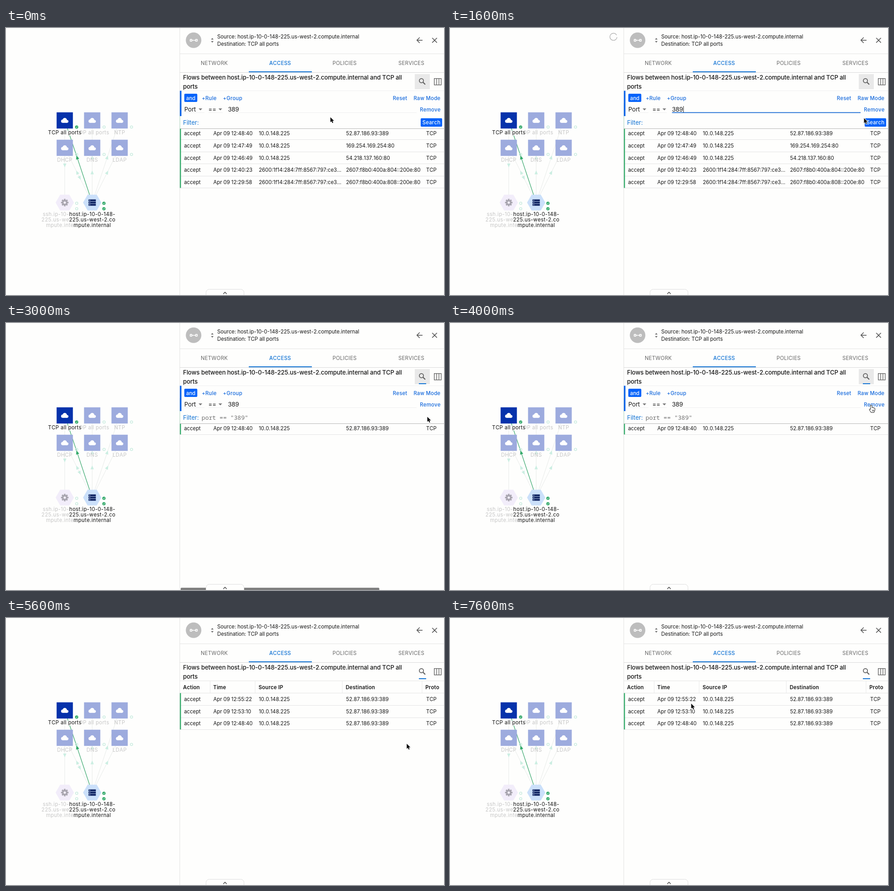
An HTML page with a canvas for the animation above (8000 ms loop, 958 px wide and 585 px high).

```html
<!DOCTYPE html>
<html lang="en">
<head>
<meta charset="utf-8">
<title>Flow search</title>
<style>
html, body { margin: 0; width: 100%; height: 100%; overflow: hidden; background: #fefefd; }
canvas { display: block; width: 958px; height: 585px; }
</style>
</head>
<body>
<canvas id="stage" width="958" height="585"></canvas>
<script>
const ctx = document.getElementById('stage').getContext('2d');
const LOOP = 8000, STEP = 200;
const BG = '#fefefd', INK = '#151515', GREY = '#666', BLUE = '#0a62e8', BUTTON = '#0563fa',
      LINK = '#1469dc', GREEN = '#32a969', RULE = '#e4e4e4';
const SMALL = 11.28, LARGE = 13.16, ROW = 26.55, TABLE_TOP = 164.5;

// y is the middle of the capital letters
function text(str, x, y, o = {}) {
  const size = o.size || SMALL;
  ctx.font = `${o.weight || 400} ${size}px ${o.mono ? '"Noto Sans Mono", monospace' : 'Inter, sans-serif'}`;
  ctx.fontKerning = 'none';
  ctx.letterSpacing = (o.gap || 0) + 'px';
  ctx.textAlign = o.align || 'left';
  const base = y + size * 0.364;
  if (o.halo) {
    ctx.strokeStyle = BG;
    ctx.lineWidth = 3;
    ctx.lineJoin = 'round';
    ctx.strokeText(str, x, base);
  }
  ctx.fillStyle = o.color || INK;
  ctx.fillText(str, x, base);
}

function rect(x, y, w, h, color, r = 0) {
  ctx.fillStyle = color;
  ctx.beginPath();
  ctx.roundRect(x, y, w, h, r);
  ctx.fill();
}

function path(points, color, width, closed) {
  ctx.beginPath();
  points.forEach(([x, y]) => ctx.lineTo(x, y));
  if (closed) ctx.closePath();
  ctx.lineJoin = 'miter';
  if (width) {
    ctx.strokeStyle = color;
    ctx.lineWidth = width;
    ctx.stroke();
  } else {
    ctx.fillStyle = color;
    ctx.fill();
  }
}

function disc(x, y, r, color) {
  ctx.fillStyle = color;
  ctx.beginPath();
  ctx.arc(x, y, r, 0, Math.PI * 2);
  ctx.fill();
}

function ring(x, y, r, color, width, from = 0, to = Math.PI * 2) {
  ctx.strokeStyle = color;
  ctx.lineWidth = width;
  ctx.beginPath();
  ctx.arc(x, y, r, from, to);
  ctx.stroke();
}

/* ---------- graph ---------- */

const HOST = [188.5, 382.5], SSH = [128.5, 382.5];
const CLOUDS = [
  ['TCP all ports', 128.5, 202.5], ['UDP all ports', 188.5, 202.5], ['NTP', 248.5, 202.5],
  ['DHCP', 128.5, 262.5], ['DNS', 188.5, 262.5], ['LDAP', 248.5, 262.5]
];

function arrow(a, b, at, color) {
  const angle = Math.atan2(b[1] - a[1], b[0] - a[0]);
  ctx.save();
  ctx.translate(a[0] + (b[0] - a[0]) * at, a[1] + (b[1] - a[1]) * at);
  ctx.rotate(angle);
  path([[4.5, 0], [-4, -3.6], [-4, 3.6]], color);
  ctx.restore();
}

function edge(a, b, line, head, width) {
  path([a, b], line, width);
  arrow(a, b, 0.55, head);
}

function cloud(x, y) {
  disc(x - 4.4, y + 1.7, 3.6, '#fff');
  disc(x, y - 0.6, 4.8, '#fff');
  disc(x + 4.8, y + 2.1, 3.2, '#fff');
  rect(x - 4.4, y + 1, 9.2, 4.3, '#fff');
}

function status(x, y, active) {
  if (!active) {
    ring(x, y, 2.6, '#c5eadd', 1.3);
    return;
  }
  disc(x, y, 3.6, GREEN);
  path([[x - 1.7, y], [x - 0.4, y + 1.3], [x + 1.8, y - 1.2]], '#fff', 1);
}

function hexagon([x, y], color) {
  path([[-20, 0], [-10, -17.3], [10, -17.3], [20, 0], [10, 17.3], [-10, 17.3]]
    .map(([dx, dy]) => [x + dx, y + dy]), color, 0, true);
}

function gear([x, y]) {
  const color = '#a9a6b0';
  for (let i = 0; i < 8; i++) {
    ctx.save();
    ctx.translate(x, y);
    ctx.rotate(i * Math.PI / 4);
    rect(-1.7, -8.2, 3.4, 4, color);
    ctx.restore();
  }
  ring(x, y, 4.4, color, 3.6);
}

function server([x, y]) {
  for (let i = -1; i <= 1; i++) {
    rect(x - 8, y + i * 4.9 - 2, 16, 4, '#0d2160');
    rect(x - 6, y + i * 4.9 - 0.7, 1.6, 1.4, '#cfe2fb');
  }
}

function hostLabel(name, x, o) {
  [name + '.ip-10-0-148-', '225.us-west-2.co', 'mpute.internal']
    .forEach((line, i) => text(line, x, 408.3 + i * 11.7, o));
}

function drawGraph() {
  const faint = { color: '#c6c6c6', gap: 0.4, align: 'center' };
  const strong = { color: '#111', gap: 0.38, align: 'center', halo: true };
  const line = '#e8ebe9', head = '#cbeee2';
  const dhcp = [128.5, 262.5];
  CLOUDS.slice(1).forEach(([, x, y]) => edge(HOST, [x, y], line, head, 1));
  arrow(dhcp, HOST, 0.55, head);
  path([[128.5, 202.5], SSH], line, 1);
  arrow(dhcp, SSH, 0.32, head);
  edge(HOST, [128.5, 202.5], '#43ac75', GREEN, 1.3);

  hexagon(SSH, '#f2edfa');
  gear(SSH);
  hexagon(HOST, '#cbe0fa');
  server(HOST);

  CLOUDS.forEach(([name, x, y], i) => {
    rect(x - 17.8, y - 17.8, 35.6, 35.6, i ? '#9dabde' : '#0632ab');
    cloud(x, y);
    status(x + 26, y + 14.5, !i);
    if (i) text(name, x, y + 26, faint);
  });
  [384, 396].forEach(y => {
    status(154.7, y, false);
    status(214.2, y, true);
  });
  text('TCP all ports', 128.7, 228.5, strong);
  hostLabel('ssh', 128.5, faint);
  hostLabel('host', 188.7, strong);
}

/* ---------- side panel ---------- */

function drawHeader() {
  rect(379.5, 0, 1, 585, '#e2e2e2');
  disc(410.3, 26.8, 17, '#bdbdbd');
  rect(405, 26.2, 10, 1.5, '#fff');
  for (const x of [402, 413.8]) {
    rect(x, 24, 5.4, 5.8, '#fff', 1.5);
    rect(x + 1.7, 25.8, 2, 2.2, '#bdbdbd');
  }
  path([[448.3, 25.3], [451.2, 22], [454.1, 25.3]], GREY);
  path([[448.3, 28.7], [451.2, 32], [454.1, 28.7]], GREY);
  text('Source: host.ip-10-0-148-225.us-west-2.compute.internal', 462, 19);
  text('Destination: TCP all ports', 462, 35.3);
  path([[911, 26.8], [899, 26.8]], '#555', 1.6);
  path([[904.8, 20.8], [898.8, 26.8], [904.8, 32.8]], '#555', 1.6);
  path([[932.2, 21.7], [942.6, 32.1]], '#555', 1.6);
  path([[942.6, 21.7], [932.2, 32.1]], '#555', 1.6);
  rect(380, 56, 578, 1, RULE);

  [['NETWORK', 455.5], ['ACCESS', 599.6], ['POLICIES', 740.6], ['SERVICES', 886.6]].forEach(([name, x], i) =>
    text(name, x, 77.2, { align: 'center', gap: 0.3, color: i === 1 ? '#1173d4' : GREY, weight: i === 1 ? 500 : 400 }));
  rect(380, 97, 578, 1, '#d9d9d9');
  rect(531, 95, 138, 2, '#1173d4');

  const title = { size: 13.1, weight: 500, gap: -0.12 };
  text('Flows between host.ip-10-0-148-225.us-west-2.compute.internal and TCP all', 387.3, 108.2, title);
  text('ports', 387.3, 128.2, title);
}

function drawTools(s) {
  if (!s.closed) rect(894, 101, 33, 33, '#e9e9e9');
  ring(908.6, 115.4, 4.5, '#5c5c5c', 1.7);
  path([[912, 118.8], [917, 123.8]], '#5c5c5c', 2.2);
  if (s.applied) rect(903, 132, 16, 2, '#1173d4');
  ctx.strokeStyle = '#666';
  ctx.lineWidth = 1.4;
  ctx.strokeRect(936.7, 110.7, 15.2, 14);
  rect(941.2, 110.7, 1.4, 14, '#666');
  rect(946.2, 110.7, 1.4, 14, '#666');
}

const LOCAL = '10.0.148.225', LDAP_PEER = '52.87.186.93:389', V6 = '2600:1f14:284:7ff:8567:797:ce3...';
const MATCHES = [
  ['12:55:22', LOCAL, LDAP_PEER],
  ['12:53:10', LOCAL, LDAP_PEER],
  ['12:48:40', LOCAL, LDAP_PEER]
];
const OTHERS = [
  ['12:47:49', LOCAL, '169.254.169.254:80'],
  ['12:46:49', LOCAL, '54.218.137.160:80'],
  ['12:40:23', V6, '2607:f8b0:400a:804::200e:80'],
  ['12:29:58', V6, '2607:f8b0:400a:808::200e:80']
];

function drawTable(s) {
  rect(380, 137.3, 578, 1, RULE);
  [['Action', 387.3], ['Time', 453.3], ['Source IP', 552.5], ['Destination', 743], ['Proto', 917.3]]
    .forEach(([name, x]) => text(name, x, 151.8, { weight: 600, gap: 0.2 }));
  [446, 544.5, 735, 909.5].forEach(x => rect(x, 138, 1, 26, '#e9e9e9'));
  rect(380, 164, 578, 1, RULE);

  const rows = s.filtered ? MATCHES : MATCHES.concat(OTHERS);
  rows.forEach(([time, from, to], i) => {
    const y = TABLE_TOP + ROW * i, mid = y + 13.7;
    text('accept', 389.4, mid);
    text('Apr 09 ' + time, 453.5, mid);
    text(from, 553, mid);
    text(to, 743.7, mid);
    text('TCP', 919, mid);
    rect(380, Math.round(y + ROW), 578, 1, RULE);
  });
  rect(380.3, TABLE_TOP, 2.4, ROW * rows.length, GREEN);
}

function dropdown(label, x, arrowX, end) {
  text(label, x, 178.6, { size: LARGE, gap: -0.05 });
  path([[arrowX - 4, 176.3], [arrowX + 4, 176.3], [arrowX, 180.5]], '#777');
  rect(x, 185, end - x, 1, '#efefef');
}

function drawFilter(s) {
  const shift = s.removed ? -25 : 0, mid = 207.3 + shift;
  const link = { color: LINK, weight: 500, gap: 0.25 };
  rect(380.5, 137, 577.5, 84 + shift, BG);
  rect(380, 137, 578, 1, '#f0f0f0');
  rect(380.3, 137.5, 3.4, s.removed ? 31 : 55.5, BLUE);

  rect(390, 144, 28.4, 18, BUTTON, 2);
  text('and', 394, 153.4, { color: '#fff', weight: 500 });
  text('+Rule', 428.3, 153.6, link);
  text('+Group', 474.5, 153.6, link);
  text('Reset', 846, 153.6, link);
  text('Raw Mode', 891.5, 153.6, link);

  if (!s.removed) {
    dropdown('Port', 390, 425.3, 434);
    dropdown('==', 442.5, 468.8, 474);
    text('389', 485.6, 178.6, { size: LARGE, gap: -0.2 });
    if (s.focused) {
      rect(485.6, 184.6, 412.4, 1.6, '#1769d2');
      rect(510.2, 171, 1, 14, '#222');
    } else {
      rect(485.6, 185, 412.4, 1, '#efefef');
    }
    text('Remove', 905.3, 178.4, link);
  }

  text('Filter:', 387.3, mid, { size: LARGE, color: '#1173d4', gap: -0.08 });
  if (s.applied) text('port == "389"', 427.8, mid, { size: 13.1, color: '#707070', mono: true });
  if (!s.applied || s.removed) {
    rect(907, mid - 9.6, 47, 18.6, BUTTON, 2);
    text('Search', 910.8, mid, { color: '#fff', weight: 500, gap: 0.25 });
  }
  rect(380, 220 + shift, 578, 1, '#b5b5b5');
}

function drawDrawer(s) {
  if (s.scrolling) rect(382, 580, 434.5, 6, '#808080', 2);
  ctx.beginPath();
  ctx.roundRect(437.5, 572.5, 83, 20, 7);
  ctx.fillStyle = BG;
  ctx.fill();
  ctx.strokeStyle = '#dedede';
  ctx.lineWidth = 1;
  ctx.stroke();
  path([[475.3, 582.6], [479, 578.9], [482.7, 582.6]], '#555', 1.5);
}

/* ---------- pointer ---------- */

const POINTER = [
  [0, 709, 195], [400, 700, 180], [1000, 700, 180], [1600, 905, 197], [2000, 924, 207],
  [2400, 924, 207], [3000, 921, 205], [3400, 921, 205], [3800, 921, 181], [4400, 921, 181],
  [5000, 882, 264], [5200, 909, 120], [5400, 909, 120], [5600, 876, 275], [6200, 876, 275],
  [7200, 545, 246], [7600, 527, 187], [8000, 527, 187]
];

function pointerAt(t) {
  const i = POINTER.findIndex(k => k[0] > t);
  const [t0, x0, y0] = POINTER[i - 1], [t1, x1, y1] = POINTER[i];
  const u = (t - t0) / (t1 - t0), e = u * u * (3 - 2 * u);
  return [x0 + (x1 - x0) * e, y0 + (y1 - y0) * e];
}

function outlined(shape, fill, edgeColor, width) {
  ctx.lineJoin = 'round';
  ctx.lineWidth = width;
  ctx.strokeStyle = edgeColor;
  ctx.stroke(shape);
  ctx.fillStyle = fill;
  ctx.fill(shape);
}

const ARROW = new Path2D('M0.5 0.5V11.5L3 9.2L4.8 13.3L6.7 12.5L5 8.5H8.5Z');
const HAND = new Path2D('M-1.2 0.2Q0 -1.2 1.2 0.2L1.6 5Q3 4 4 5.2Q5.4 4.5 6.2 5.8Q7.8 5.4 8.2 7L7.6 11L6.2 14.5H0.2L-3 9.6Q-3.8 7.8 -2.2 7.8L-0.4 9Z');

function drawPointer(t, s) {
  const [x, y] = pointerAt(t);
  ctx.save();
  ctx.translate(x, y);
  if (s.hand) {
    outlined(HAND, '#fff', '#111', 1.8);
    [2.4, 4, 5.6].forEach(dx => rect(dx, 9, 0.8, 3.6, '#333'));
  } else {
    outlined(ARROW, '#0a0a0a', '#fff', 1.8);
  }
  ctx.restore();
}

/* ---------- timeline ---------- */

function stateAt(t) {
  const during = (a, b) => t >= a && t < b;
  return {
    focused: during(400, 2200),
    loading: during(1200, 2600),
    applied: t >= 2200,
    filtered: t >= 2600,
    scrolling: during(2600, 3400),
    removed: t >= 4400,
    closed: t >= 5400,
    hand: during(1800, 2200) || during(3800, 4400) || during(5200, 5600)
  };
}

function draw(t) {
  const s = stateAt(t);
  rect(0, 0, 958, 585, BG);
  drawGraph();
  if (s.loading) {
    const a = (t - 1600) / 1000 * Math.PI * 2;
    ring(357.5, 19.3, 7.8, '#b4b4b4', 1.4, a + 0.1, a + Math.PI * 2 - 0.5);
  }
  drawHeader();
  drawTable(s);
  if (!s.closed) drawFilter(s);
  drawTools(s);
  drawDrawer(s);
  drawPointer(t, s);
}

const start = performance.now();
function tick() {
  const t = (performance.now() - start) % LOOP;
  draw(Math.floor(t / STEP) * STEP);
  requestAnimationFrame(tick);
}
tick();
</script>
</body>
</html>
```
